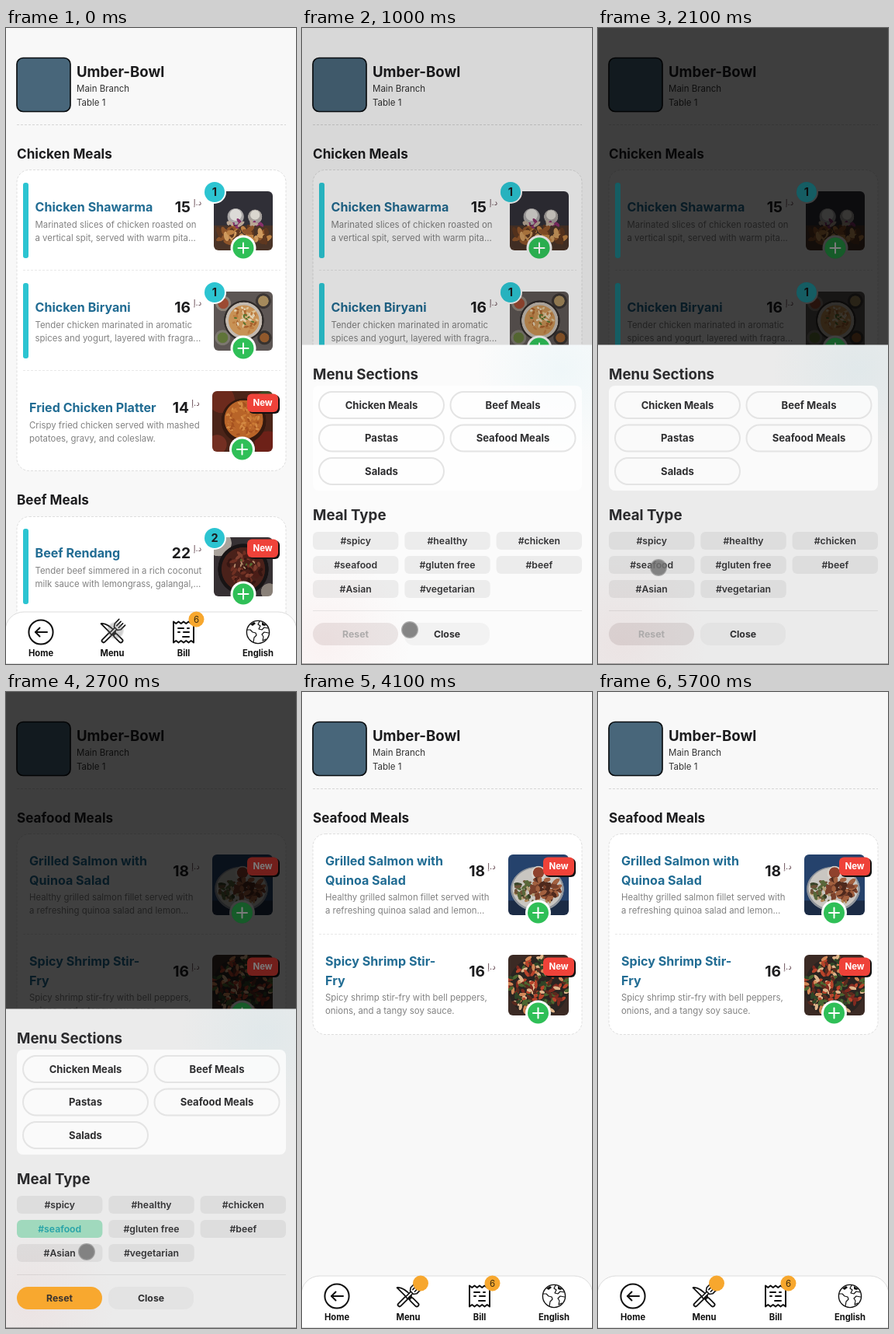
Write an HTML page with a canvas that moves like this. It is 374x818 px and loops after 5.8 s.

```html
<!DOCTYPE html>
<html lang="en">
<head>
<meta charset="utf-8">
<title>Restaurant menu</title>
<style>
html, body { margin: 0; width: 100%; height: 100%; overflow: hidden; background: #f8f8f8; }
canvas { display: block; width: 374px; height: 818px; }
</style>
</head>
<body>
<canvas id="stage"></canvas>
<script>
const W = 374, H = 818, LOOP = 5800;
const OPEN = 990, PICK = 2200, CLOSE = 3390, CLOSED = 3550, SHEET = 407.5;
const TEAL = '#2cc4d1', GREEN = '#2fbf57', ORANGE = '#f7a72e', INK = '#1c1c1e';
const ratio = window.devicePixelRatio || 1;
const stage = document.getElementById('stage');
const layer = document.createElement('canvas');
for (const c of [stage, layer]) {
  c.width = W * ratio;
  c.height = H * ratio;
}
let g = stage.getContext('2d');

const clamp = v => Math.max(0, Math.min(1, v));
const mix = (a, b, p) => a + (b - a) * p;
const smooth = p => p * p * (3 - 2 * p);

function drawOn(canvas, scale, fn) {
  const main = g;
  g = canvas.getContext('2d');
  g.setTransform(scale, 0, 0, scale, 0, 0);
  g.clearRect(0, 0, canvas.width, canvas.height);
  fn();
  g = main;
}
function text(s, x, y, size, weight, color, align = 'left') {
  g.font = `${weight} ${size}px Inter, "Open Sans", sans-serif`;
  g.fillStyle = color;
  g.textAlign = align;
  g.fillText(s, x, y + size * 0.36);
}
function box(x, y, w, h, r, fill, stroke, width = 1) {
  g.beginPath();
  g.roundRect(x, y, w, h, r);
  if (fill) { g.fillStyle = fill; g.fill(); }
  if (stroke) { g.strokeStyle = stroke; g.lineWidth = width; g.stroke(); }
}
function disc(x, y, r, fill) {
  g.beginPath();
  g.arc(x, y, r, 0, Math.PI * 2);
  g.fillStyle = fill;
  g.fill();
}
function ring(x, y, r, width, color) {
  g.beginPath();
  g.arc(x, y, r, 0, Math.PI * 2);
  g.lineWidth = width;
  g.strokeStyle = color;
  g.stroke();
}
function path(points, close) {
  g.beginPath();
  points.forEach(([x, y], i) => i ? g.lineTo(x, y) : g.moveTo(x, y));
  if (close) g.closePath();
}
function dashed(x1, x2, y, color) {
  g.setLineDash([3, 2]);
  g.strokeStyle = color;
  g.lineWidth = 1;
  path([[x1, y], [x2, y]]);
  g.stroke();
  g.setLineDash([]);
}

// Dish pictures: flat shapes in a 100 x 100 square, drawn once.
function random(seed) {
  return () => (seed = (seed * 16807) % 2147483647) / 2147483647;
}
function scatter(seed, n, cx, cy, rx, ry, size, colors) {
  const rnd = random(seed);
  for (let i = 0; i < n; i++) {
    const a = rnd() * Math.PI * 2, d = Math.sqrt(rnd());
    g.beginPath();
    g.ellipse(cx + Math.cos(a) * d * rx, cy + Math.sin(a) * d * ry,
      size * (0.6 + rnd() * 0.6), size * 0.45, rnd() * 3, 0, Math.PI * 2);
    g.fillStyle = colors[i % colors.length];
    g.fill();
  }
}
const paint = {
  wraps() {
    box(0, 0, 100, 100, 0, '#302f37');
    box(0, 58, 100, 42, 0, '#4a3428');
    disc(37, 43, 14, '#a9a6a6'); disc(37, 40, 10, '#dcdad7');
    disc(70, 43, 12, '#a5a09c'); disc(70, 40, 8, '#dad6cf');
    scatter(11, 14, 50, 56, 34, 5, 6, ['#87306a', '#b9a796']);
    scatter(23, 40, 50, 76, 46, 15, 9, ['#bd8144', '#8f552a', '#cf9a5e', '#5f3820']);
  },
  rice() {
    box(0, 0, 100, 100, 0, '#5d5654');
    disc(16, 20, 13, '#8b8177'); disc(16, 20, 9, '#9c4a32');
    disc(84, 16, 13, '#3c3634'); disc(84, 16, 9, '#a58a5c');
    disc(15, 78, 13, '#7c786f'); disc(15, 78, 9, '#5f7438');
    disc(86, 78, 12, '#37322f'); disc(86, 78, 8, '#91592c');
    disc(51, 49, 34, '#302b29'); disc(51, 49, 31, '#c3bab0');
    disc(51, 49, 26, '#c89255');
    scatter(7, 42, 51, 48, 23, 22, 4, ['#dcc193', '#a8622e', '#e2d0b0', '#bd7c40']);
    scatter(31, 7, 51, 46, 16, 14, 3, ['#54742f']);
  },
  fried() {
    box(0, 0, 100, 100, 0, '#4b2418');
    disc(15, 14, 22, '#6c2a1c'); disc(92, 88, 22, '#6d2118');
    disc(88, 18, 18, '#3b4c26'); disc(8, 88, 16, '#732f22');
    disc(52, 49, 37, '#35190f'); disc(52, 47, 32, '#b86428');
    scatter(17, 90, 52, 46, 29, 27, 4, ['#cb7a34', '#a65220', '#d48a44', '#bb682d']);
  },
  stew() {
    box(0, 0, 100, 100, 0, '#363033');
    disc(8, 10, 22, '#aaa39c'); disc(94, 92, 14, '#898078');
    disc(50, 54, 43, '#181415'); disc(50, 54, 37, '#4a211a');
    scatter(41, 60, 50, 54, 31, 28, 6, ['#6f3023', '#351612', '#824030', '#4b1d17']);
    scatter(5, 9, 50, 42, 22, 12, 3, ['#b08a6a', '#55692e']);
  },
  salmon() {
    box(0, 0, 100, 100, 0, '#25426c');
    box(0, 76, 100, 24, 0, '#1b2b45');
    g.save();
    g.translate(48, 57);
    g.scale(1, 0.84);
    disc(0, 0, 44, '#8f949b');
    disc(0, -1, 41, '#c9c6c1');
    g.restore();
    disc(50, 31, 12, '#d8d2ca'); disc(50, 30, 9, '#8f412c');
    scatter(13, 34, 29, 58, 17, 16, 6, ['#58683a', '#b59f78', '#394328', '#6e5238']);
    scatter(29, 44, 61, 56, 23, 19, 8, ['#7a412c', '#a2603f', '#4e291d']);
    scatter(3, 9, 48, 77, 24, 4, 4, ['#b08452', '#6f7347']);
  },
  shrimp() {
    box(0, 0, 100, 100, 0, '#3b2a24');
    disc(50, 53, 50, '#2a2421');
    scatter(19, 190, 50, 51, 50, 49, 6,
      ['#b8442b', '#4b6630', '#d28858', '#802a20', '#dfb48a', '#2f4527', '#5a2a1e']);
  }
};
const photos = {};
for (const name in paint) {
  const c = document.createElement('canvas');
  c.width = c.height = 160;
  drawOn(c, 1.6, paint[name]);
  photos[name] = c;
}

const starters = [
  { y: 183, title: ['Chicken Shawarma'], price: '15', photo: 'wraps', count: 1,
    desc: ['Marinated slices of chicken roasted on', 'a vertical spit, served with warm pita...'] },
  { y: 312, title: ['Chicken Biryani'], price: '16', photo: 'rice', count: 1,
    desc: ['Tender chicken marinated in aromatic', 'spices and yogurt, layered with fragra...'] },
  { y: 441, title: ['Fried Chicken Platter'], price: '14', photo: 'fried', fresh: true,
    desc: ['Crispy fried chicken served with mashed', 'potatoes, gravy, and coleslaw.'] },
  { y: 628, title: ['Beef Rendang'], price: '22', photo: 'stew', count: 2, fresh: true,
    desc: ['Tender beef simmered in a rich coconut', 'milk sauce with lemongrass, galangal,...'] }
];
const seafood = [
  { y: 183, title: ['Grilled Salmon with', 'Quinoa Salad'], price: '18', photo: 'salmon', fresh: true,
    desc: ['Healthy grilled salmon fillet served with', 'a refreshing quinoa salad and lemon...'] },
  { y: 312, title: ['Spicy Shrimp Stir-', 'Fry'], price: '16', photo: 'shrimp', fresh: true,
    desc: ['Spicy shrimp stir-fry with bell peppers,', 'onions, and a tangy soy sauce.'] }
];

function rowText(row) {
  const x = row.count ? 37.5 : 30, y = row.y, two = row.title.length > 1;
  row.title.forEach((s, i) => text(s, x, y + (two ? 34 + i * 25 : 47), 16.1, 700, '#216c93'));
  row.desc.forEach((s, i) => text(s, x, y + (two ? 81 : 70) + i * 17, 11.4, 400, '#828282'));
  text(row.price, row.count ? 238 : 236, y + 47, 19.2, 700, INK, 'right');
  g.font = '10px "DejaVu Sans", sans-serif';
  g.fillStyle = '#63464f';
  g.textAlign = 'center';
  g.fillText('د.إ', row.count ? 247 : 244.5, y + 45);
}

function rowPhoto(row) {
  const on = row.count, x = on ? 268 : 266, y = row.y + (on ? 27 : 26), size = on ? 76 : 78;
  g.save();
  g.beginPath();
  g.roundRect(x, y, size, size, 6);
  g.clip();
  g.drawImage(photos[row.photo], x, y, size, size);
  g.restore();
  disc(on ? 306 : 304.5, row.y + (on ? 100 : 101), 16.5, '#fff');
  if (on) disc(269, row.y + 28, 15, '#fff');
}

function rowAccents(row) {
  const y = row.y, on = row.count;
  const px = on ? 306 : 304.5, py = y + (on ? 100 : 101);
  disc(px, py, 13.5, GREEN);
  box(px - 7.5, py - 1, 15, 2, 1, '#fff');
  box(px - 1, py - 7.5, 2, 15, 1, '#fff');
  if (on) {
    box(22, y + 16, 7, 97, 3, TEAL);
    disc(269, y + 28, 13, TEAL);
    text(String(on), 269, y + 28, 14.5, 700, INK, 'center');
  }
  if (row.fresh) {
    box(313, y + 31, 40, 24, 6, '#111');
    box(311, y + 29.5, 40, 23.5, 6, '#ef4239');
    text('New', 331, y + 41, 11.5, 700, '#fff', 'center');
  }
}

function card(y, h) {
  g.setLineDash([3, 2]);
  box(14, y - 0.5, 347, h, 16, '#fff', '#dedede');
  g.setLineDash([]);
}

function page(list, dim) {
  g.fillStyle = '#f8f8f8';
  g.fillRect(0, 0, W, H);
  box(14, 38.5, 69, 69, 8, '#48667a', '#0b0f12', 1.7);
  text('Umber-Bowl', 91, 56, 18.6, 700, INK);
  text('Main Branch', 91, 78, 11.5, 400, '#333');
  text('Table 1', 91, 96, 11.5, 400, '#333');
  dashed(14, 361, 124.5, '#d6d6d6');
  const first = list === starters;
  text(first ? 'Chicken Meals' : 'Seafood Meals', 14, 162, 17.1, 700, INK);
  card(183, first ? 387 : 258);
  dashed(22, 354, 311.5, '#e8e8e8');
  if (first) {
    dashed(22, 354, 440.5, '#e8e8e8');
    text('Beef Meals', 14, 607, 17.1, 700, INK);
    card(629, 300);
  }
  list.forEach(rowText);
  list.forEach(rowPhoto);
  list.forEach(rowAccents);
  if (dim > 0) {
    g.fillStyle = `rgba(0,0,0,${dim})`;
    g.fillRect(0, 0, W, H);
    // Saturated parts stay a little brighter under the shade.
    drawOn(layer, ratio, () => list.forEach(rowAccents));
    g.globalAlpha = 0.3;
    g.drawImage(layer, 0, 0, W, H);
    g.globalAlpha = 1;
  }
}

function cutlery() {
  g.save();
  g.translate(137, 777);
  g.lineWidth = 1.8;
  g.strokeStyle = '#111';
  g.fillStyle = '#fff';
  // knife
  g.save();
  g.rotate(-Math.PI / 4);
  g.beginPath();
  g.moveTo(-2.5, 3);
  g.lineTo(-2.5, -18);
  g.quadraticCurveTo(4, -13, 3, 3);
  g.closePath();
  g.fill();
  g.stroke();
  box(-2.4, 4, 4.8, 14, 2.2, '#fff', '#111', 1.8);
  g.restore();
  // fork
  g.rotate(Math.PI / 4);
  box(-2.2, 2, 4.4, 16, 2.2, '#fff', '#111', 1.8);
  box(-1.7, -8, 3.4, 11, 1, '#fff', '#111', 1.6);
  path([[-5.5, -18], [-5.5, -10], [-3, -6.5], [3, -6.5], [5.5, -10], [5.5, -18]]);
  g.fill();
  g.stroke();
  path([[-1.8, -17.5], [-1.8, -10]]);
  g.stroke();
  path([[1.8, -17.5], [1.8, -10]]);
  g.stroke();
  g.restore();
}

function receipt() {
  const edge = [];
  for (let i = 0; i <= 8; i++) edge.push([216 + i * 3.25, i % 2 ? 766 : 763.5]);
  for (let i = 8; i >= 0; i--) edge.push([216 + i * 3.25, i % 2 ? 788 : 790.5]);
  path(edge, true);
  g.lineWidth = 2;
  g.strokeStyle = '#111';
  g.stroke();
  for (const [x, y, w] of [[221, 771, 9], [233, 771, 4], [221, 776, 4], [228, 776, 9], [227, 782, 10]])
    box(x, y, w, 2, 1, '#111');
}

function globe() {
  ring(325, 777, 14.6, 1.4, '#111');
  g.lineWidth = 1.2;
  g.strokeStyle = g.fillStyle = '#111';
  path([[311.5, 774], [315, 774], [318, 777], [322, 778], [323, 781], [320, 784], [319, 790]]);
  g.stroke();
  path([[327, 763], [325, 767], [328, 769], [326, 773], [330, 774], [333, 771], [338, 772]]);
  g.stroke();
  path([[338.5, 778], [333, 777], [330, 780], [332, 783], [331, 788], [335, 786]]);
  g.stroke();
  path([[330, 764], [336, 768], [333, 769], [330, 768]], true);
  g.fill();
  path([[315, 767], [320, 764], [322, 766], [318, 769]], true);
  g.fill();
}

function nav(filtered) {
  box(-1, 751, 376, 90, 24, '#fff', '#dcdcdc');
  box(0, 817, W, 1, 0, '#dedede');
  ring(45, 777, 15.6, 2, '#111');
  g.lineWidth = 2;
  g.lineCap = g.lineJoin = 'round';
  path([[53, 777], [38, 777]]);
  g.stroke();
  path([[43.5, 771.5], [38, 777], [43.5, 782.5]]);
  g.stroke();
  cutlery();
  receipt();
  globe();
  g.lineCap = 'butt';
  g.lineJoin = 'miter';
  if (filtered) disc(153, 760.5, 10, ORANGE);
  disc(245.5, 760.5, 10, ORANGE);
  text('6', 245.5, 760.5, 11.5, 400, '#3a2a10', 'center');
  [['Home', 45], ['Menu', 137], ['Bill', 229], ['English', 325]]
    .forEach(([s, x]) => text(s, x, 804, 11.2, 700, '#111', 'center'));
}

function glow(x, y, r, color) {
  const fill = g.createRadialGradient(x, y, 0, x, y, r);
  fill.addColorStop(0, `rgba(${color},.09)`);
  fill.addColorStop(1, `rgba(${color},0)`);
  g.fillStyle = fill;
  g.fillRect(0, SHEET, W, H - SHEET);
}

const sections = ['Chicken Meals', 'Beef Meals', 'Pastas', 'Seafood Meals', 'Salads'];
const tags = ['#spicy', '#healthy', '#chicken', '#seafood', '#gluten free', '#beef', '#Asian', '#vegetarian'];

function sheet(picked, dim, shift) {
  const tone = Math.round(255 * 0.895 + 248 * (1 - dim) * 0.105);
  g.save();
  g.translate(0, shift);
  g.fillStyle = `rgb(${tone},${tone},${tone})`;
  g.fillRect(0, SHEET, W, H - SHEET);
  glow(335, 440, 110, '120,205,225');
  glow(30, 790, 110, '240,150,150');
  text('Menu Sections', 14, 445, 18.7, 700, '#2b2b2d');
  box(14, 460, 347, 135, 8, 'rgba(255,255,255,.78)');
  sections.forEach((s, i) => {
    const x = i % 2 ? 191.5 : 22, y = 468 + Math.floor(i / 2) * 42.5;
    box(x, y, 161, 34, 17, null, '#e4e4e4', 2);
    text(s, x + 80.5, y + 17, 13.05, 700, '#2e2e30', 'center');
  });
  text('Meal Type', 14, 626, 18.7, 700, '#2b2b2d');
  tags.forEach((s, i) => {
    const x = 14 + (i % 3) * 118.3, y = 648 + Math.floor(i / 3) * 31;
    const on = picked && s === '#seafood';
    box(x, y, 110.4, 23, 6, on ? '#a0d9bd' : 'rgba(0,0,0,.06)');
    text(s, x + 55.2, y + 11.5, 12.25, 600, on ? '#27a3a8' : '#343436', 'center');
  });
  box(14, 749, 347, 1, 0, 'rgba(0,0,0,.08)');
  box(14, 765, 110, 29, 14.5, picked ? '#f8a82f' : `rgba(80,45,45,${mix(0.1, 0.12, dim)})`);
  text('Reset', 69, 779.5, 12.3, 700, picked ? '#3b3430' : '#adabab', 'center');
  box(132, 765, 110, 29, 12, 'rgba(0,0,0,.035)');
  text('Close', 187, 779.5, 12.3, 700, '#2e2e30', 'center');
  box(0, 817, W, 1, 0, 'rgba(0,0,0,.3)');
  g.restore();
}

const route = [
  [0, 141, 775], [1000, 139, 774], [1400, 137.5, 772], [2100, 78, 694], [2300, 78, 694],
  [2700, 104, 720], [3250, 184, 779], [3350, 184, 779], [3600, 164, 780], [3900, 152, 778]
];
function pointer(t) {
  if (t >= 3900) return;
  const i = route.findIndex(k => k[0] > t);
  const a = route[i - 1], b = route[i], p = smooth((t - a[0]) / (b[0] - a[0]));
  const x = mix(a[1], b[1], p), y = mix(a[2], b[2], p);
  g.globalAlpha = t < OPEN ? 0.3 : 1 - clamp((t - 3700) / 200);
  disc(x, y, 11, 'rgba(120,120,120,.6)');
  disc(x, y, 9.8, 'rgba(110,110,110,.6)');
  g.globalAlpha = 1;
}

function shade(t) {
  if (t < OPEN || t > CLOSED) return 0;
  if (t < CLOSE) return mix(0.13, 0.75, smooth(clamp((t - 1000) / 380)));
  return 0.75 * (1 - (t - CLOSE) / (CLOSED - CLOSE));
}

function draw(now) {
  const t = now % LOOP, picked = t >= PICK, dim = shade(t);
  g.setTransform(ratio, 0, 0, ratio, 0, 0);
  page(picked ? seafood : starters, dim);
  if (t < OPEN || t >= CLOSE) nav(picked);
  if (t >= OPEN && t < CLOSED) {
    const out = clamp((t - CLOSE) / (CLOSED - CLOSE));
    sheet(picked, dim, 411 * out * out);
  }
  pointer(t);
}

const start = performance.now();
function tick() {
  draw(performance.now() - start);
  requestAnimationFrame(tick);
}
tick();
</script>
</body>
</html>
```
